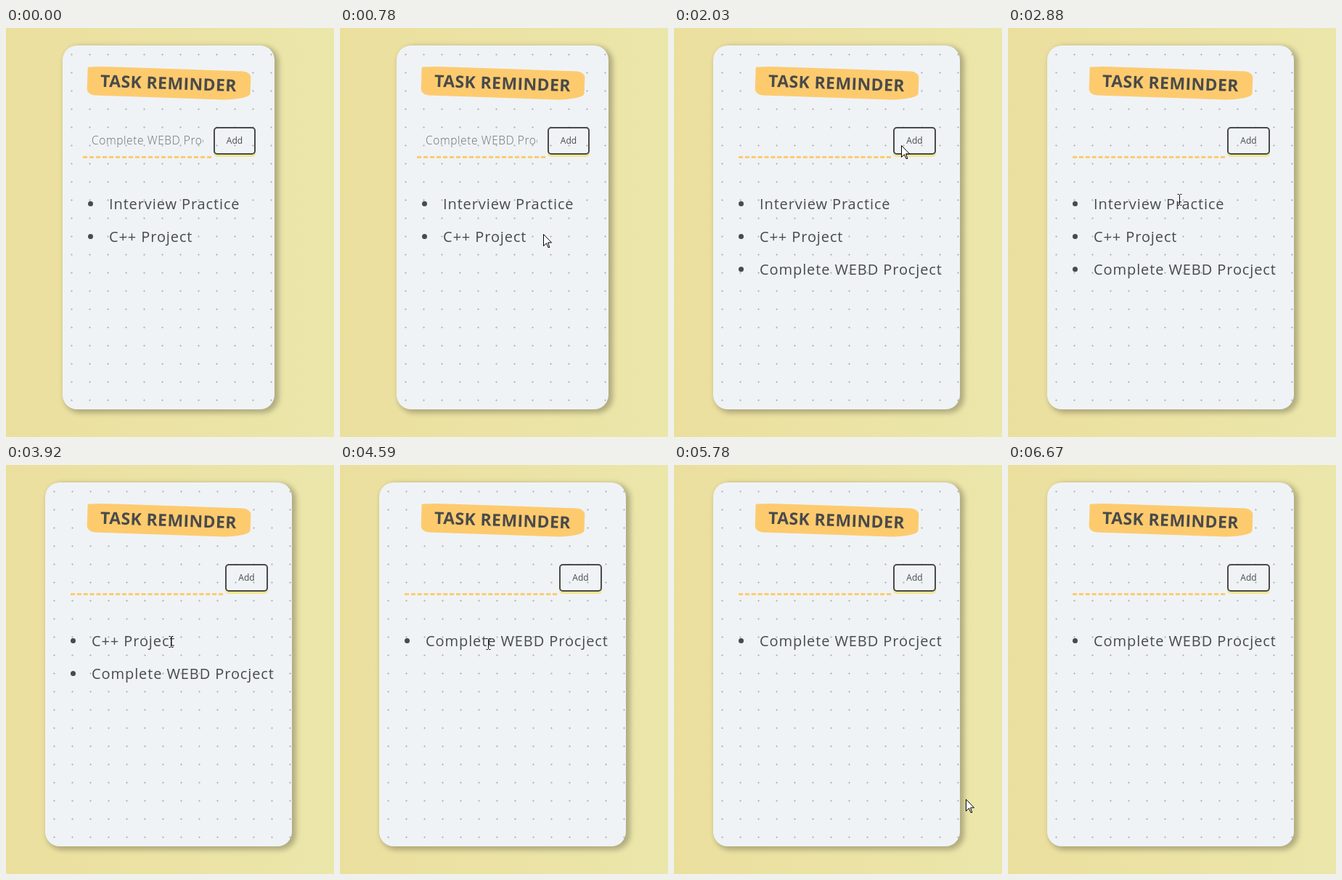
An HTML page for the animation above (6880 ms loop, 452 by 562 pixels).

```html
<!DOCTYPE html>
<html lang="en">
<head>
<meta charset="utf-8">
<title>Task reminder</title>
<style>
  html, body { margin: 0; width: 100%; height: 100%; overflow: hidden; }
  body { position: relative; background: linear-gradient(90deg, #ebdf9e, #ebe6aa); }
  div, body > svg { position: absolute; box-sizing: border-box; }
  #card {
    top: 24px; height: 500px; border-radius: 20px;
    background: #eff3f6 radial-gradient(#bfc0c1 7.2%, transparent 0) 0 0 / 25px 25px;
    box-shadow: 4px 3px 7px 2px #00000040;
  }
  #banner {
    left: 112px; top: 56px; width: 225px; height: 40px;
    background: #fdcb6e; transform: rotate(2deg);
    border-radius: 20% 5% 20% 5% / 5% 20% 25% 20%;
  }
  #field { top: 140px; height: 39px; border-bottom: 3px dashed #fdcb6e; }
  #button {
    top: 136px; height: 38px; border: 2px solid #494a4b;
    border-radius: 5px; box-shadow: 0 3px 0 #f0e68c;
  }
  body > svg { left: 0; top: 0; }
  text { font-family: "Open Sans", "Noto Sans", sans-serif; fill: #494a4b; }
  .title { font-size: 23px; font-weight: 700; letter-spacing: .4px; text-anchor: middle; }
  .item { font-size: 20px; letter-spacing: .9px; }
  .typed { font-size: 15.5px; font-weight: 300; letter-spacing: .6px; fill: #6c6d6e; }
  .label { font-size: 12px; text-anchor: middle; }
</style>
</head>
<body>
<div id="card"></div>
<div id="banner"></div>
<div id="field"></div>
<div id="button"></div>
<svg width="452" height="562" viewBox="0 0 452 562">
  <text class="title" x="224" y="84" transform="rotate(2 224.5 76)">TASK REMINDER</text>
  <svg id="typed" x="118" y="140" width="154" height="30" overflow="hidden">
    <text class="typed" x="0" y="20">Complete WEBD Procject</text>
  </svg>
  <text id="label" class="label" y="159">Add</text>
  <g id="list"></g>
  <circle id="halo" r="12" fill="#ff0" fill-opacity=".47"/>
  <path id="arrow" d="M.5 .5V16.5L4.5 12.7L6.9 18.5H8.8L6.6 11.9H11.5Z"
        fill="#fff" stroke="#000" stroke-width="1"/>
  <path id="beam" d="M-.5 -6.5H1.5L2.5 -5.5L3.5 -6.5H5.5M2.5 -5.5V7.5M-.5 8.5H1.5L2.5 7.5L3.5 8.5H5.5"
        fill="none" stroke="#111" stroke-width="1"/>
</svg>
<script>
const LOOP = 6880;
const $ = id => document.getElementById(id);

const linear = u => u;
const easeOut = u => 1 - (1 - u) ** 2;
const easeInOut = u => u * u * (3 - 2 * u);

// Pointer moves: each starts where the previous one ended.
const ENTRY = [452, 562];
const moves = [
  { start: 500, end: 810, steps: 10, to: [278, 280], ease: easeOut },
  { start: 1070, end: 1400, steps: 12, to: [306, 163], ease: easeOut },
  { start: 1430, end: 1560, steps: 5, to: [313, 161], ease: linear },
  { start: 2460, end: 3050, steps: 20, to: [226, 242], ease: easeOut },
  { start: 3920, end: 4130, steps: 8, to: [202, 245], ease: easeInOut },
  { start: 5040, end: 5280, steps: 9, to: [357, 326], ease: easeInOut },
  { start: 5640, end: 5780, steps: 5, to: [402, 459], ease: linear },
  { start: 6010, end: 6310, steps: 11, to: [425, 561], ease: linear },
];

const ADDED = 2030;
const clicks = [[1820, ADDED], [3250, 3480], [4360, 4590]];
const tasks = [
  { name: "Interview Practice", from: 0, until: 3480 },
  { name: "C++ Project", from: 0, until: 4590 },
  { name: "Complete WEBD Procject", from: ADDED, until: LOOP },
];

for (const task of tasks) {
  $("list").insertAdjacentHTML("beforeend",
    `<g><circle cy="241.5" r="3.5" fill="#494a4b"/><text class="item" y="249">${task.name}</text></g>`);
  task.node = $("list").lastChild;
}

function pointerAt(t) {
  let from = ENTRY;
  for (const { start, end, steps, to, ease } of moves) {
    if (t < start) break;
    const step = Math.floor((t - start) / (end - start) * (steps - 1) + 1e-6) + 1;
    if (step < steps) {
      const u = ease(step / steps);
      return from.map((a, i) => Math.round(a + (to[i] - a) * u));
    }
    from = to;
  }
  return from;
}

const show = (node, on) => node.setAttribute("visibility", on ? "visible" : "hidden");
const place = (node, x, y) => node.setAttribute("transform", `translate(${x} ${y})`);

function setSpan(node, left, width) {
  node.style.left = left + "px";
  node.style.width = width + "px";
}

function render(t) {
  const wide = t >= ADDED;
  setSpan($("card"), wide ? 54 : 78, wide ? 340 : 292);
  setSpan($("field"), wide ? 89 : 106, wide ? 210 : 177);
  setSpan($("button"), wide ? 302 : 286, wide ? 59 : 58);
  $("label").setAttribute("x", wide ? 331.5 : 315);
  show($("typed"), !wide);

  let row = 0;
  for (const { node, from, until } of tasks) {
    const visible = t >= from && t < until;
    show(node, visible);
    if (!visible) continue;
    place(node, 0, 45 * row++);
    node.firstChild.setAttribute("cx", wide ? 92.5 : 116.5);
    node.lastChild.setAttribute("x", wide ? 118 : 142);
  }

  const [x, y] = pointerAt(t);
  const present = t >= 500 && t < 6670;
  const overText = wide && x < 298 && y > 226 && y < 258;
  for (const id of ["halo", "arrow", "beam"]) place($(id), x, y);
  show($("halo"), clicks.some(([a, b]) => t >= a && t < b));
  show($("arrow"), present && !overText);
  show($("beam"), present && overText);
}

const began = performance.now();
function tick() {
  render((performance.now() - began) % LOOP);
  requestAnimationFrame(tick);
}
tick();
</script>
</body>
</html>
```
